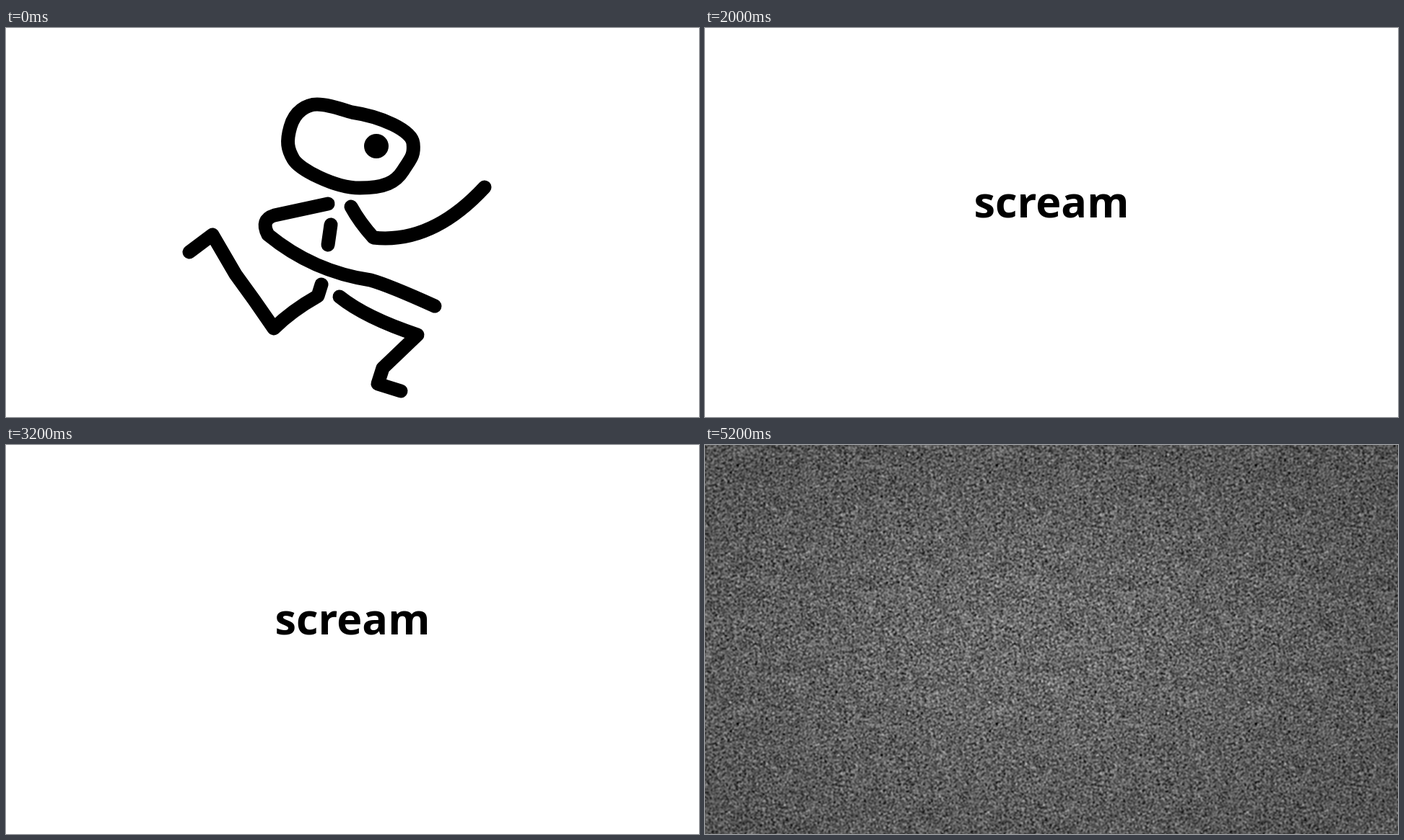
Write an HTML page without scripts that moves like this. It is 960x540 px and loops after 6 s.

```html
<!DOCTYPE html>
<html lang="en">
<head>
<meta charset="utf-8">
<title>Run, scream, static</title>
<style>
  html, body { margin: 0; width: 100%; height: 100%; overflow: hidden; background: #fff; }
  svg { display: block; width: 100%; height: 100%; }

  /* Each scene holds a third of the loop. */
  .scene { opacity: 0; animation: show 6s step-end infinite; }
  .word { animation-delay: -4s; }
  .static { animation-delay: -2s; }
  @keyframes show {
    0% { opacity: 1; }
    33.3333%, 100% { opacity: 0; }
  }

  .limbs { fill: none; stroke: #000; stroke-width: 19; stroke-linecap: round; stroke-linejoin: round; }
  text { font: 700 59.3px "Open Sans", "Noto Sans", sans-serif; text-anchor: middle; }
</style>
</head>
<body>
<svg viewBox="0 0 960 540">
  <defs>
    <!-- near-white noise, softened into grains, then stretched in contrast -->
    <filter id="grain" x="-.02" y="-.02" width="1.04" height="1.04" color-interpolation-filters="sRGB">
      <feTurbulence type="fractalNoise" baseFrequency=".713" numOctaves="2" seed="7"/>
      <feColorMatrix values="1 1 1 0 -1
                             1 1 1 0 -1
                             1 1 1 0 -1
                             0 0 0 0 1"/>
      <feGaussianBlur stdDeviation=".95"/>
      <feComponentTransfer>
        <feFuncR type="linear" slope="2.8" intercept="-.99"/>
        <feFuncG type="linear" slope="2.8" intercept="-.99"/>
        <feFuncB type="linear" slope="2.8" intercept="-.99"/>
      </feComponentTransfer>
    </filter>
    <radialGradient id="shade" cx=".46" cy=".5" r=".62">
      <stop offset=".2" stop-opacity="0"/>
      <stop offset="1" stop-opacity=".2"/>
    </radialGradient>
  </defs>

  <g class="scene runner">
    <g class="limbs">
      <!-- head -->
      <path d="M479 117C462 112 446 106 431 106S400 116 394 137S390 168 398 182S455 222 490 222S540 214 550 198S566 178 564 160S520 123 479 117"/>
      <!-- arms -->
      <path d="M446 244L372 260Q352 266 363 287Q425 338 505 350Q530 357 594 386"/>
      <path d="M478 248Q490 270 509 291Q590 300 663 221"/>
      <!-- body -->
      <path d="M450 273L446 301"/>
      <!-- legs -->
      <path d="M254 311L286 287L318 342L344 378L371 417Q395 393 432 372L437 356"/>
      <path d="M462 373Q498 402 570 426L522 472L515 494L547 504"/>
    </g>
    <circle cx="513" cy="164" r="17"/>
  </g>

  <text class="scene word" x="480" y="263">scream</text>

  <g class="scene static">
    <rect width="960" height="540" filter="url(#grain)"/>
    <rect width="960" height="540" fill="url(#shade)"/>
  </g>
</svg>
</body>
</html>
```
